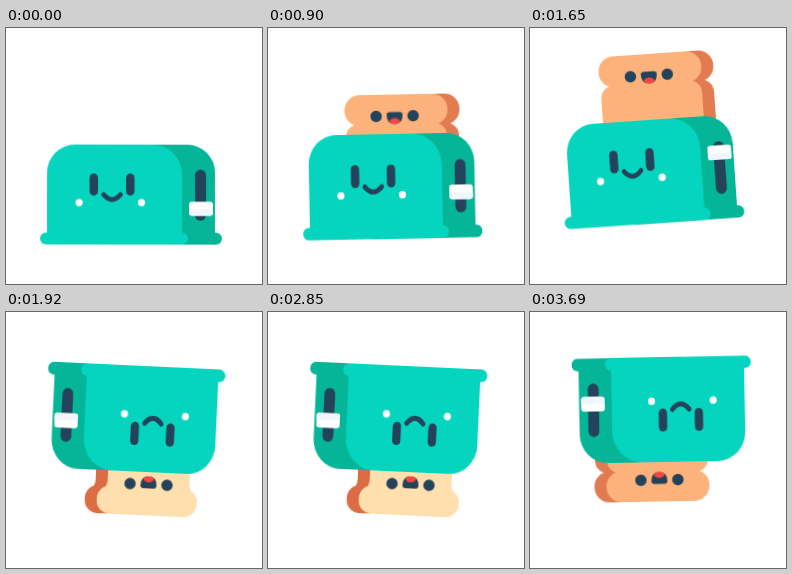
Animation, 256 px wide and 256 px high, one loop 3.72 s. Source, as an HTML page without scripts:

```html
<!DOCTYPE html>
<html lang="en">
<head>
<meta charset="utf-8">
<title>Bouncing toaster</title>
<style>
  html, body { margin: 0; width: 100%; height: 100%; overflow: hidden; background: #fff; }
  svg { display: block; width: 100vw; height: 100vh; }

  .flip { transform-origin: 128px 128px; animation: flip 3720ms step-end infinite; }
  .hop, .stretch { transform-origin: 125px 217px; }
  .hop, .stretch, .lever, .face, .pale, .brown { animation: 930ms linear infinite; }
  .hop { animation-name: hop; }
  .stretch { animation-name: stretch; }
  .lever { animation-name: lever; }
  .face { animation-name: face; }
  .pale { animation-name: pale; }
  .brown { animation-name: brown; }

  .mint { fill: #05d5be; }
  .green { fill: #05b597; }
  .ink { fill: #24425a; }
  .white { fill: #fff; }
  .pale .crumb { fill: #ffdfad; }
  .pale .crust { fill: #dc6c43; }
  .brown .crumb { fill: #fdb27c; }
  .brown .crust { fill: #e37b50; }

  /* The whole scene turns over halfway through the loop */
  @keyframes flip {
    0% { transform: none; }
    50.75%, 100% { transform: rotate(180deg); }
  }
  /* Two hops per cycle: cubic rise, cubic fall */
  @keyframes hop {
    0%, 48.39% { transform: translateY(0) rotate(0); animation-timing-function: cubic-bezier(.333, 1, .667, 1); }
    21.5% { transform: translateY(-22px) rotate(4deg); animation-timing-function: cubic-bezier(.333, 0, .667, 0); }
    69.9% { transform: translateY(-22px) rotate(-4deg); animation-timing-function: cubic-bezier(.333, 0, .667, 0); }
    100% { transform: translateY(0) rotate(0); }
  }
  @keyframes stretch {
    0%, 48.39%, 100% { transform: scale(1); }
    6.45%, 54.84% { transform: scale(.975, 1.06); }
    21.5%, 69.9% { transform: scale(.99, 1.03); }
    45.16%, 96.77% { transform: scale(.985, 1.05); }
  }
  @keyframes lever {
    0%, 48.39% { transform: translateY(0); animation-timing-function: cubic-bezier(.333, 1, .667, 1); }
    21.5%, 69.9% { transform: translateY(-29px); animation-timing-function: cubic-bezier(.333, 0, .667, 0); }
    100% { transform: translateY(0); }
  }
  @keyframes face {
    0%, 45.16%, 48.39%, 96.77%, 100% { transform: translateY(0); }
    6.45%, 54.84% { transform: translateY(-4px); }
  }
  @keyframes pale {
    0% { transform: translate(109px, 121px); animation-timing-function: cubic-bezier(.333, 1, .667, 1); }
    21.5% { transform: translate(109px, 41px); animation-timing-function: cubic-bezier(.333, 0, .667, 0); }
    48.39%, 100% { transform: translate(109px, 121px); }
  }
  @keyframes brown {
    0%, 48.39% { transform: translate(130px, 122px); animation-timing-function: cubic-bezier(.333, 1, .667, 1); }
    69.9% { transform: translate(130px, 47px); animation-timing-function: cubic-bezier(.333, 0, .667, 0); }
    96.77% { transform: translate(130px, 71px); }
    100% { transform: translate(130px, 122px); }
  }
</style>
</head>
<body>
<svg viewBox="0 0 256 256">
  <defs>
    <g id="slice">
      <rect x="-50" width="100" height="28" rx="13"/>
      <path d="M-46 22Q-42 27-42 34V95H40V34Q40 27 46 22Z"/>
    </g>
    <g id="bun">
      <rect x="-51" width="103" height="31" rx="15"/>
      <rect x="-50" y="29" width="101" height="63" rx="13"/>
    </g>
    <g id="toastFace">
      <circle class="ink" cx="-18.5" r="5.7"/>
      <circle class="ink" cx="18.5" r="5.7"/>
      <path class="ink" d="M-8-1Q-8-4-5-4H5Q8-4 8-1Q8 8 0 8T-8-1Z"/>
      <path fill="#f5473f" d="M-5.5 5.5Q-4 2 0 2T5.5 5.5Q3.5 8 0 8T-5.5 5.5Z"/>
    </g>
  </defs>

  <g class="flip">
    <g class="hop">
      <g class="brown">
        <use class="crust" href="#bun" x="12"/>
        <use class="crumb" href="#bun"/>
        <use href="#toastFace" x="-1" y="21.5"/>
      </g>
      <g class="pale">
        <use class="crust" href="#slice" x="12"/>
        <use class="crumb" href="#slice"/>
        <use href="#toastFace" x="-1" y="31"/>
      </g>

      <g class="stretch">
        <path class="green" d="M120 117H181A28 28 0 0 1 209 145V210H120Z"/>
        <rect class="green" x="100" y="205" width="116" height="12" rx="6"/>
        <path class="mint" d="M41 210V145A28 28 0 0 1 69 117H146A30 30 0 0 1 176 147V210Z"/>
        <rect class="mint" x="34" y="205" width="148" height="12" rx="6"/>

        <rect class="ink" x="189" y="142" width="11" height="51" rx="5.5"/>
        <g class="lever">
          <rect class="white" x="183" y="174.5" width="24" height="14" rx="3"/>
          <path fill="#f0f6fa" d="M183 182H207V185.500A3 3 0 0 1 204 188.5H186A3 3 0 0 1 183 185.5Z"/>
        </g>

        <g class="face">
          <rect class="ink" x="83.5" y="146" width="8.5" height="22" rx="4.25"/>
          <rect class="ink" x="120" y="146" width="8.5" height="22" rx="4.25"/>
          <path d="M97.5 167Q106 177 114.5 167" fill="none" stroke="#24425a" stroke-width="4.8" stroke-linecap="round"/>
          <circle class="white" cx="73" cy="175" r="3.6"/>
          <circle class="white" cx="135.5" cy="175" r="3.6"/>
        </g>
      </g>
    </g>
  </g>
</svg>
</body>
</html>
```
